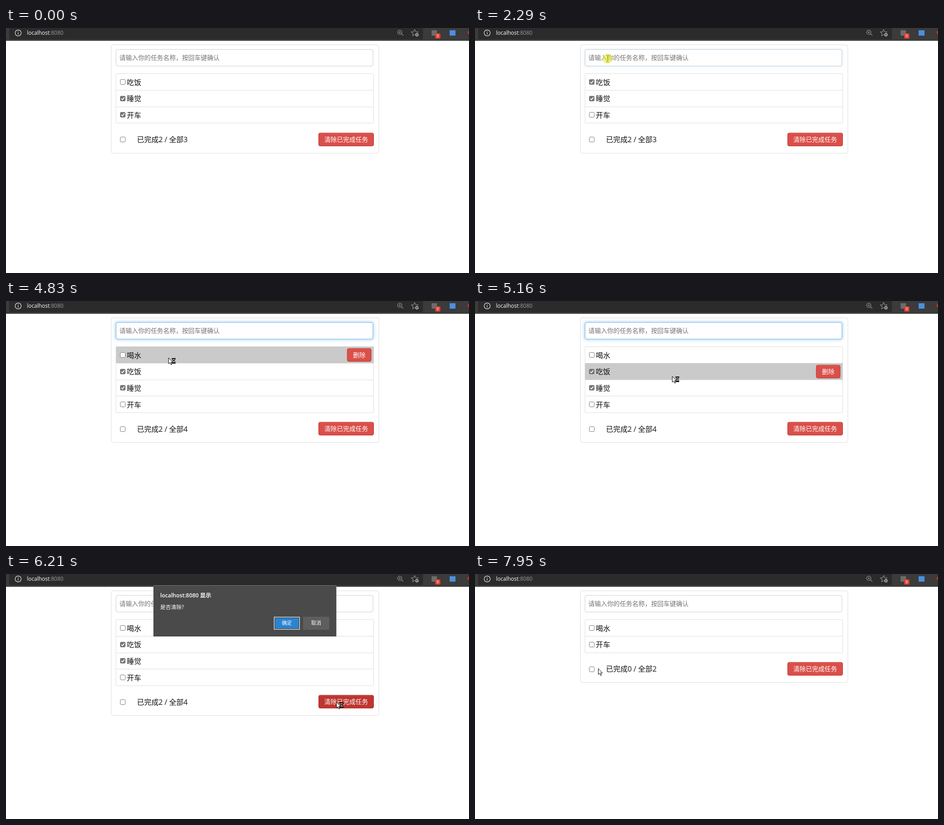
An HTML page that plays this animation: 1027 px wide and 545 px high, repeating every 8 s.

```html
<!DOCTYPE html>
<html lang="zh-CN">
<head>
<meta charset="utf-8">
<style>
  html, body { margin: 0; width: 100%; height: 100%; overflow: hidden; background: #fff; }
  svg { display: block; }
  text { font-family: "Open Sans", "Noto Sans CJK SC", "Noto Sans CJK", sans-serif; white-space: pre; }
</style>
</head>
<body>
<svg id="stage" width="1027" height="545" viewBox="0 0 1027 545">
  <defs>
    <filter id="blur" x="-5%" y="-50%" width="110%" height="200%"><feGaussianBlur stdDeviation="3"/></filter>
  </defs>
  <g id="page"></g>
  <g id="bar">
    <rect width="1027" height="28.5" fill="#3b3b3b"/>
    <path d="M7 0H925V22q0 3-3 3H10q-3 0-3-3z" fill="#2b2b2b"/>
    <g fill="none" stroke="#e8e8e8" stroke-width="1.2">
      <circle cx="27" cy="11" r="6.7"/><path d="M27 9.8v4.7M27 7v1.4"/>
    </g>
    <text x="46.5" y="15" font-size="12" fill="#fff">localhost<tspan fill="#999">:8080</tspan></text>
    <g fill="none" stroke="#929292" stroke-width="1.2">
      <circle cx="873.5" cy="9.5" r="4.8"/><path d="M877 13l4.500 4M871 9.500h5M873.500 7v5"/>
      <path d="M906.500 3.500l2.200 4.500 5 .700-3.600 3.500.9 5-4.500-2.400-4.500 2.400.9-5-3.600-3.500 5-.7z"/>
    </g>
    <circle cx="911.500" cy="15" r="4.300" fill="#a8a8a8" stroke="#2b2b2b"/>
    <path d="M909.500 15h4M911.500 13v4" stroke="#2b2b2b"/>
    <rect x="944" y="5" width="12" height="12" fill="#6c6c6c"/>
    <rect x="952" y="12" width="11.500" height="11.500" rx="2" fill="#e33f2f"/>
    <text x="957.700" y="21" font-size="9" fill="#fff" text-anchor="middle">9</text>
    <rect x="984" y="5" width="13" height="12" fill="#4a8fe0"/>
    <circle cx="1029" cy="10" r="5" fill="#d3301f"/>
  </g>
  <g id="top"></g>
</svg>
<script>
const LOOP = 8000, TOP = 101.3, PITCH = 36.7;
const ADD = 4260, CLEAR = 6050, ASK = 6150, CONFIRM = 6960, CLOSE = 7060;
const CLICKS = [430, 740, 1340, 1580, 2240, CLEAR, CONFIRM];
const HOLD = 120;

// pointer tip: time, x, y
const PATH = [
  [80, 240, 450], [250, 246, 320], [420, 259, 195], [560, 259, 193], [700, 260, 160], [880, 261, 157],
  [930, 262, 153], [1190, 265, 136], [1320, 260, 121], [1440, 260, 121], [1570, 260, 158],
  [1720, 262, 162], [1790, 266, 164], [2200, 292, 70], [2380, 296, 66],
  [3300, 296, 68], [3580, 276, 165], [3800, 275, 163], [4100, 279, 158], [4260, 279, 158],
  [4600, 305, 140], [4830, 360, 126], [5070, 410, 150], [5550, 553, 240], [5820, 690, 303],
  [6000, 735, 288], [6200, 735, 288], [6700, 625, 132], [6900, 609, 117], [7080, 609, 117],
  [7400, 330, 200], [7530, 258, 212], [7720, 248, 208], [7950, 273, 210]
];

const page = document.getElementById('page'), top_ = document.getElementById('top');
const rowLine = i => Math.round(TOP + PITCH * i) + .5;

function pointer(t) {
  const i = PATH.findIndex(p => p[0] > t);
  if (i < 0) return PATH[PATH.length - 1].slice(1);
  if (!i) return null;
  const a = PATH[i - 1], b = PATH[i], k = (t - a[0]) / (b[0] - a[0]);
  return [1, 2].map(n => a[n] + (b[n] - a[n]) * k);
}

const rect = (x, y, w, h, attrs) => `<rect x="${x}" y="${y}" width="${w}" height="${h}" ${attrs}/>`;
const text = (x, y, size, str, attrs = 'fill="#111"') =>
  `<text x="${x}" y="${y}" font-size="${size}" ${attrs}>${str}</text>`;
const line = y => `<path d="M244 ${y}H815.500" stroke="#ddd"/>`;

function checkbox(y, on, hover) {
  const c = hover ? '#505050' : '#767676';
  return rect(253.5, y - 5.5, 11, 11, `rx="2" fill="${on ? c : '#fff'}" stroke="${c}"`) +
    (on ? `<path d="M255.800 ${y}l2.500 2.600 4.300-5.300" fill="none" stroke="#fff" stroke-width="1.800"/>` : '');
}

function button(x, y, w, label, dark) {
  const fill = dark ? '#bd362f' : '#da4f49';
  return rect(x + .5, y + .5, w - 1, 29, `rx="3.500" fill="${fill}" stroke="#bd362f"`) +
    `<path d="M${x + 3} ${y + 1.5}H${x + w - 3}" stroke="#fff" opacity=".2"/>` +
    text(x + w / 2, y + 19.8, 13.9, label, 'fill="#fff" text-anchor="middle"');
}

function inputBox(t) {
  const glow = Math.max(0, Math.min(1, (t - 2260) / 150, (CLEAR + 150 - t) / 150));
  const typed = t >= 2770 && t < ADD;
  const box = attrs => rect(244, 47.7, 570, 37, 'rx="4" ' + attrs);
  return (glow ? box(`fill="none" stroke="#52a8ec" stroke-width="3" opacity="${glow * .7}" filter="url(#blur)"`) : '') +
    box('fill="#fff" stroke="#ccc"') +
    (glow ? box(`fill="none" stroke="#75b9f0" opacity="${glow}"`) : '') +
    (typed ? text(251.5, 72.3, 13.9, '喝水')
      : text(251.5, 71.3, 13.9, '请输入你的任务名称，按回车键确认', 'fill="#757575"'));
}

function dialog() {
  return rect(327, 25, 406, 114, 'fill="#4a4a4a"') +
    '<path d="M327 25.500H732.500V139" fill="none" stroke="#777"/>' +
    text(342, 52, 12.3, 'localhost:8080 显示', 'fill="#fff" font-weight="600"') +
    text(342, 78, 11.9, '是否清除?', 'fill="#fff"') +
    rect(595, 96, 56, 27, 'fill="#2b84d0" stroke="#b9bec3" stroke-width="2"') +
    rect(596.5, 97.5, 53, 24, 'fill="none" stroke="#303840"') +
    rect(659, 95, 58, 29, 'fill="#5e5e5e"') +
    text(623, 113.2, 11, '确定', 'fill="#fff" text-anchor="middle"') +
    text(688, 113.2, 11, '取消', 'fill="#fff" text-anchor="middle"');
}

const ARROW = '<path d="M.5 .5V13.500l3-2.700 2.300 5 2-.9-2.200-4.900h4.200z" fill="#fff" stroke="#000"/>';
const GLASS = '<path d="M7.500 1.700h8.500M7.500 12.300h8.500" stroke="#000" stroke-width="1.500"/>' +
  '<path d="M8.800 2.500h6v2L12.500 7l2.300 2.500v2h-6v-2L11 7 8.800 4.500z" fill="#fff" stroke="#000" stroke-width="1.200"/>' +
  '<path d="M10 4.500h3.600L11.800 6.500zM9.500 11.500l2.300-2.500 2.300 2.500z"/>';
const HAND = '<path d="M-1.500 9V1.500q0-1.300 1.300-1.300T1.100 1.500V6q2-.8 2.600.6 1.800-.6 2.200.7 2-.4 2 1.400v3q0 2-1.300 3.600v1.500H-.5V15.500l-3.800-5q-.6-1.800 1-1.800z" fill="#fff" stroke="#000"/>' +
  '<path d="M1.200 6v3.500M3.700 7v2.500M5.900 7.500v2" stroke="#000" stroke-width=".8"/>';
const BEAM = '<path d="M-3-7.500h2l1 1 1-1h2M-3 7.500h2l1-1 1 1h2M0-6.500v13" fill="none" stroke="#000"/>';

function cursor([x, y], t, overLabel, asking) {
  const inField = !asking && y > 47 && y < 85;
  const shape = overLabel ? HAND : inField ? BEAM : ARROW + (t > 4300 && t < 7350 ? GLASS : '');
  const pressed = CLICKS.some(c => t >= c && t < c + HOLD);
  return `<g transform="translate(${x.toFixed(1)} ${y.toFixed(1)})">${shape}` +
    (pressed ? '<circle r="11" fill="#e6eb28" opacity=".55"/>' : '') + '</g>';
}

function draw(t) {
  const tasks = t < ADD ? ['吃饭', '睡觉', '开车'] : t < CLOSE ? ['喝水', '吃饭', '睡觉', '开车'] : ['喝水', '开车'];
  const done = {
    '吃饭': t >= 1440,
    '睡觉': t < 840 || t >= 1680,
    '开车': t < 530
  };
  const n = tasks.length, bottom = TOP + PITCH * n;
  const asking = t >= ASK && t < CLOSE;
  const hidden = t >= 2770 && t < 3300;
  const tip = hidden ? null : pointer(t);
  const inList = tip && !asking && tip[0] > 244 && tip[0] < 815;
  const hoverRow = inList ? Math.floor((tip[1] - TOP) / PITCH) : -1;
  const overLabel = hoverRow >= 0 && hoverRow < n && tip[0] > 251 && tip[0] < 301;
  const footY = Math.round(bottom + 21.3);
  const overClear = asking ||
    (tip && tip[0] > 693 && tip[0] < 816 && tip[1] > footY && tip[1] < footY + 30);

  let s = rect(233.5, 37.5, 593.5, Math.round(bottom + 66.2) - 37, 'rx="4" fill="#fff" stroke="#ddd"') +
    inputBox(t) +
    rect(244, 101.5, 571.5, rowLine(n) - 101.5, 'rx="2" fill="#fff" stroke="#ddd"');
  tasks.forEach((name, i) => {
    const y = rowLine(i), mid = TOP + PITCH * i + 18.5, hover = i === hoverRow;
    if (i) s += line(y);
    if (hover) s += rect(244, y, 571.5, rowLine(i + 1) - y, 'fill="#cacaca"');
    s += checkbox(Math.round(mid), done[name], hover && overLabel) + text(268, mid + 6.8, 16, name);
    if (hover) s += button(756.5, Math.round(mid - 15), 54, '删除');
  });
  const count = tasks.filter(name => done[name]).length;
  s += checkbox(Math.round(bottom + 37), false) +
    text(290.5, bottom + 42.5, 16, `已完成${count} / 全部${n}`) +
    button(693, footY, 123, '清除已完成任务', overClear);
  page.innerHTML = s;
  top_.innerHTML = (asking ? dialog() : '') + (tip ? cursor(tip, t, overLabel, asking) : '');
}

const start = performance.now();
function tick() {
  draw((performance.now() - start) % LOOP);
  requestAnimationFrame(tick);
}
tick();
</script>
</body>
</html>
```
